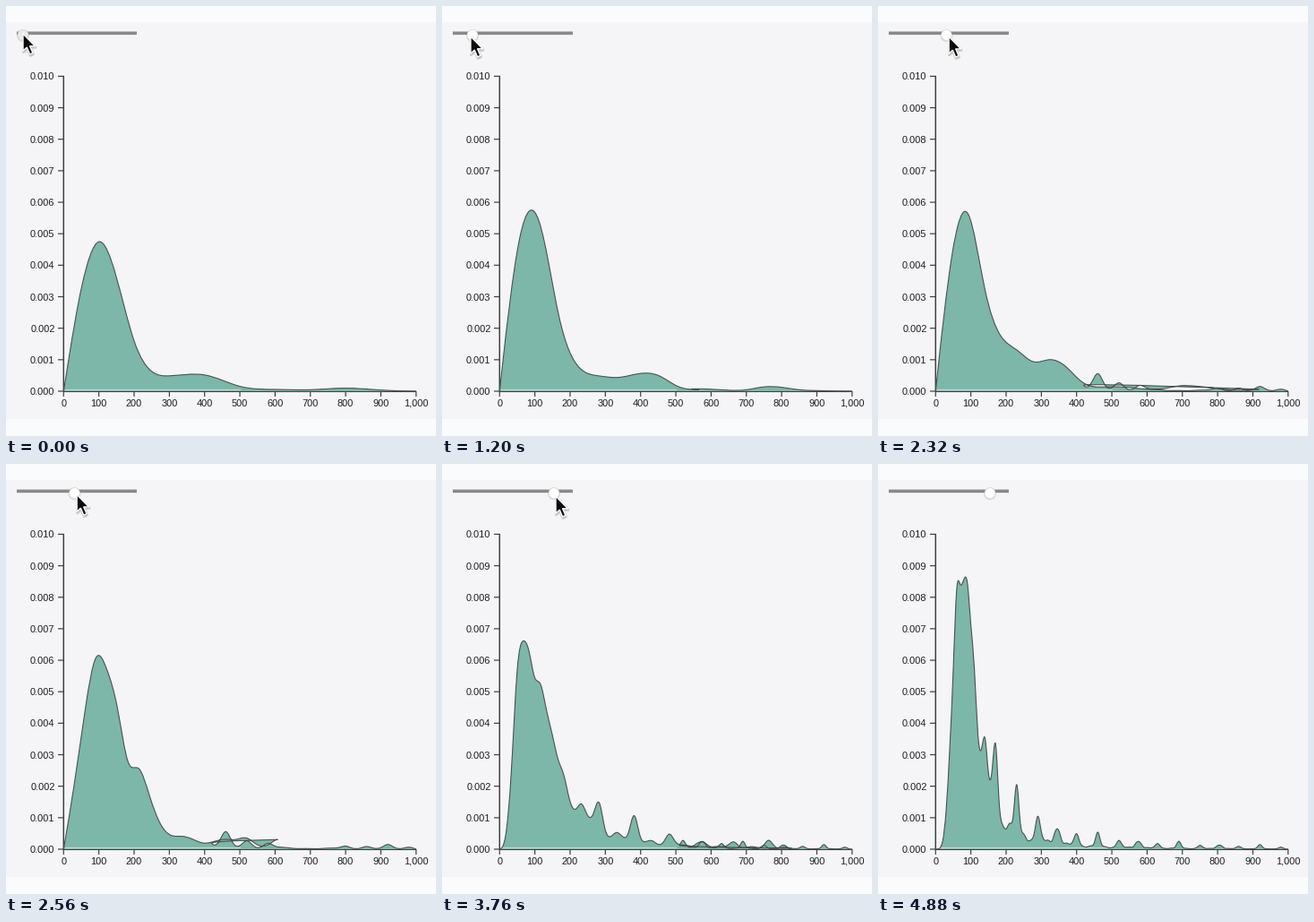
Write a matplotlib script that moves like this. It is 480 px wide and 480 px high and loops after 4960 ms.

```python
import numpy as np
import matplotlib.pyplot as plt
from matplotlib.animation import FuncAnimation
from matplotlib.patches import Circle, PathPatch, Polygon, Rectangle
from matplotlib.path import Path

SIZE, DPI = 480, 100
FRAMES, STEP_MS = 62, 80
PT = 72 / DPI                      # points per pixel
X0, X1, Y0, Y1 = 64.3, 457.8, 430, 78.4
INK = "#404043"

RATE = 1.15                        # chart units per unit of round price
BANDWIDTH = 7
MORPH_MS = 1000
FIRST_STEP, FIRST_X = 100, 19

# grab, stop and release times, handle x at the end, new sampling step
DRAGS = [(0, 400, 515, 34, 50),
         (1760, 2000, 2004, 76.5, 20),
         (2860, 3160, 3320, 125, 10)]
CURSOR_GONE = 4480

ARROW = 1.06 * np.array([(0, 0), (0, 18), (4, 14.3), (7.2, 21.6),
                         (10.3, 20.2), (7.2, 13), (12.7, 13)])


def kernel(d):
    return np.clip(1 - (d / BANDWIDTH) ** 2, 0, None)


def popularity(price):
    """Weight of one price: the rounder it is, the slower it falls off."""
    if price % 100 == 0:
        return 280 * (200 / price) ** 1.85
    if price % 50 == 0:
        return 483 * (150 / price) ** 2.2
    if price % 20 == 0:
        return 185 * (150 / price) ** 2.6
    return 135 * (150 / price) ** 3


def density(x):
    """Log-normal body, then a comb of round prices, in units of 1e-5."""
    body = 835 * np.exp(-np.log(np.maximum(x, 1) / 76) ** 2 / 0.42)
    total = body * np.clip((132 - x) / 22, 0, 1)
    for price in range(110, 860, 10):
        total += popularity(price) * kernel(x - price * RATE)
    for price, extra in ((50, 190), (75, 140), (120, 110)):
        total += extra * kernel(x - price * RATE)
    return total


def sx(value):
    return X0 + (X1 - X0) * value / 1000


def sy(value):
    return Y0 + (Y1 - Y0) * value / 0.01


def basis_vertices(step):
    """Vertices of a cubic B-spline through the sampled density."""
    xs = np.arange(0, 1001, step)
    p = np.column_stack([sx(xs), sy(density(xs) * 1e-5)])
    verts = [p[0], (5 * p[0] + p[1]) / 6]
    ends = np.vstack([p, p[-1]])
    for a, b, c in zip(ends, ends[1:], ends[2:]):
        verts += [(2 * a + b) / 3, (a + 2 * b) / 3, (a + 4 * b + c) / 6]
    verts.append(p[-1])
    return np.array(verts)


SHAPES = [basis_vertices(s) for s in (FIRST_STEP, *(d[-1] for d in DRAGS))]


def ease(t):
    t = min(max(t, 0), 1)
    return 4 * t ** 3 if t < 0.5 else 1 - (2 - 2 * t) ** 3 / 2


def curve_path(ms):
    """Vertices pair up by index; surplus ones sit at the new shape."""
    verts = SHAPES[0]
    for (_, _, release, _, _), a, b in zip(DRAGS, SHAPES, SHAPES[1:]):
        if ms > release:
            k = ease((ms - release) / MORPH_MS)
            verts = b.copy()
            verts[:len(a)] += (a - b[:len(a)]) * (1 - k)
    codes = [Path.CURVE4] * len(verts)
    codes[0], codes[1], codes[-1] = Path.MOVETO, Path.LINETO, Path.LINETO
    return Path(verts, codes)


def handle_x(ms):
    x = FIRST_X
    for grab, stop, _, end, _ in DRAGS:
        x += (end - x) * np.clip((ms - grab) / (stop - grab), 0, 1)
    return x


def cursor_tip(handle):
    # the grip on the handle shifts slightly between drags
    grips = (19, 34, 46, 125)
    return (np.interp(handle, grips, (19, 32, 49, 127)),
            np.interp(handle, grips, (31, 34, 33, 36)))


fig = plt.figure(figsize=(SIZE / DPI, SIZE / DPI), dpi=DPI,
                 facecolor="#fafbfd")
ax = fig.add_axes([0, 0, 1, 1])
ax.set(xlim=(0, SIZE), ylim=(SIZE, 0))
ax.axis("off")
ax.add_patch(Rectangle((0, 18), SIZE, 443, color="#f5f5f8", lw=0))


def line(xs, ys, color=INK, width=1.2, **kw):
    ax.plot(xs, ys, color=color, lw=width * PT, solid_capstyle="butt",
            snap=False, **kw)


def label(x, y, text, ha):
    ax.text(x, y, text, ha=ha, va="center_baseline", color="#1e1e21",
            family="Liberation Sans", size=11 * PT)


line([X0, X0], [Y1 - 0.5, Y0 + 0.5], width=1.5)
line([X0, X1], [Y0 + 0.3, Y0 + 0.3], width=1.5)
for i in range(11):
    y, x = sy(i / 1000), sx(i * 100)
    line([58, X0], [y, y])
    line([x, x], [Y0, 436])
    label(54.5, y, f"{i / 1000:.3f}", "right")
    label(x, 443, f"{i * 100:,}", "center")

fill = PathPatch(curve_path(0), fc="#7cb7a9", ec="none", zorder=3)
edge = PathPatch(curve_path(0), fc="none", ec="#4a5050", lw=1.1 * PT,
                 joinstyle="round", zorder=4)
ax.add_patch(fill)
ax.add_patch(edge)
line([66, 262], [428.4, 428.4], "#ffffff", 1.1, alpha=0.55, zorder=3.5)

line([12, 146], [30.3, 30.3], "#8a888b", 3.6, zorder=5)
shade = Circle((0, 0), 7, fc="#000000", alpha=0.1, lw=0, zorder=6)
knob = Circle((0, 0), 6, ec="#d2d2d4", lw=0.6 * PT, zorder=7)
shadow = Polygon(ARROW, fc="#000000", ec="#000000", lw=3 * PT, alpha=0.16,
                 joinstyle="round", zorder=8)
arrow = Polygon(ARROW, fc="#0a0a0a", ec="#ffffff", lw=1.4 * PT,
                joinstyle="round", zorder=9)
for patch in (shade, knob, shadow, arrow):
    ax.add_patch(patch)


def draw(frame):
    ms = frame * STEP_MS
    path = curve_path(ms)
    fill.set_path(path)
    edge.set_path(path)
    handle = handle_x(ms)
    held = any(d[0] <= ms <= d[2] + STEP_MS for d in DRAGS)
    knob.set_facecolor("#e9e9eb" if held else "#ffffff")
    knob.center = (handle, 32.5)
    shade.center = (handle, 33.2)
    tip = np.array(cursor_tip(handle))
    arrow.set_xy(ARROW + tip)
    shadow.set_xy(ARROW + tip + (0.5, 1.5))
    for patch in (arrow, shadow):
        patch.set_visible(ms < CURSOR_GONE)
    return fill, edge, knob, shade, arrow, shadow


anim = FuncAnimation(fig, draw, frames=FRAMES, interval=STEP_MS,
                     init_func=lambda: draw(0), repeat=True, repeat_delay=0)
plt.show()
```
